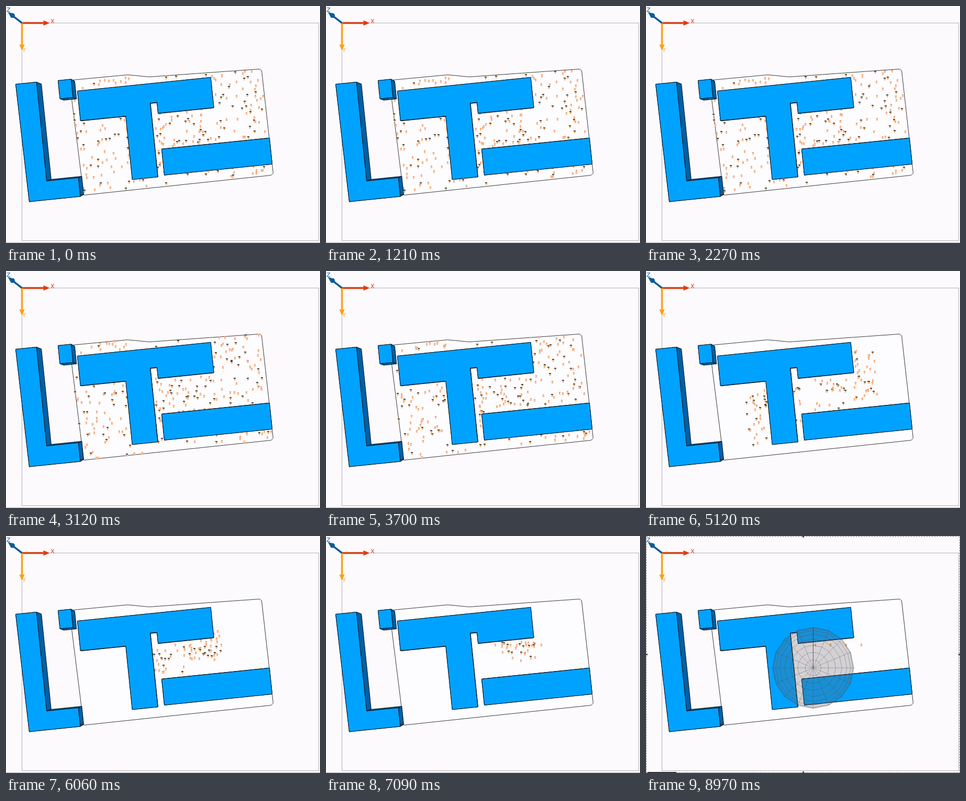
These frames come from a looping animation (600 by 453 pixels, 9000 ms). An HTML page with a canvas:

```html
<!DOCTYPE html>
<html lang="en">
<head>
<meta charset="utf-8">
<title>Crowd simulation</title>
<style>
html, body { margin: 0; width: 100%; height: 100%; overflow: hidden; background: #fcfafd; }
canvas { display: block; }
</style>
</head>
<body>
<canvas id="stage" width="600" height="453"></canvas>
<script>
const ctx = document.getElementById('stage').getContext('2d');
const LOOP = 9000, STEP = 30, TILT = 0.102;
const BLUE = '#00a2ff', SHADE = '#0060a4', INK = '#0c1420';
const EYE = [319, 251.5];

const mix = (a, b, k) => a + (b - a) * k;
const toward = (p, q, kx, ky = kx) => [mix(p[0], q[0], kx), mix(p[1], q[1], ky)];

let seed = 4127;
function rnd() {
  seed = (seed * 1664525 + 1013904223) % 4294967296;
  return seed / 4294967296;
}
const range = (a, b) => mix(a, b, rnd());

// Outline of a tilted block: lengths alternate along its width and its depth
function outline(x, y, ...lengths) {
  const c = Math.cos(TILT), s = Math.sin(TILT), points = [[x, y]];
  lengths.forEach((d, i) => {
    x += d * (i % 2 ? s : c);
    y += d * (i % 2 ? c : -s);
    points.push([x, y]);
  });
  return points;
}

const yard = [[127,141],[232,131],[273,135],[484,120],[488,123],[510,319],[506,323],[148,361],[125,177]];
const tee = outline(136, 162, 256, 58, -107, -21, -13, 142, -49, -122, -87);
const slab = outline(297, 273, 207, 50, -207);
const ell = outline(18, 149, 40, 190, 61, 36, -98);
const cube = outline(99, 142, 25, 35, -25);

function inside(poly, x, y) {
  let hit = false;
  poly.forEach(([ax, ay], i) => {
    const [bx, by] = poly[(i + 1) % poly.length];
    if ((ay > y) !== (by > y) && x < (bx - ax) * (y - ay) / (by - ay) + ax) hit = !hit;
  });
  return hit;
}
const isFree = (x, y) => inside(yard, x, y) && !inside(tee, x, y) && !inside(slab, x, y);

function spot() {
  for (;;) {
    const x = range(128, 506), y = range(124, 358);
    if (isFree(x, y) && isFree(x, y + 3)) return [x, y];
  }
}

function wander([x, y], reach) {
  for (let i = 0; i < 20; i++) {
    const nx = x + range(-reach, reach), ny = y + range(-reach, reach);
    if (isFree(nx, ny)) return [nx, ny];
  }
  return [x, y];
}

// Where a walker queues on the way in, or null if it leaves early
function queueSpot(p) {
  const [x, y] = p;
  if (y < 165 && x < 395 || y > 300 && x > 235) return null;
  if (x < 240) return toward(p, [232, 270], 0.6, 0.2);
  if (x < 296) return p;
  if (x > 395) return toward(p, [397, 212], 0.58, 0.32);
  return y > 250 ? toward(p, [360, y], 0.4) : toward(p, [385, 212], 0.35, 0.55);
}

function makePerson(i) {
  const a = spot(), b = wander(a, 28), c = wander(b, 28);
  const q = rnd() < 0.6 ? queueSpot(c) : null;
  const path = [[790, a], [2270, wander(a, 1)], [3120, b], [4270, c]];
  let end = range(4330, 5080);
  if (q) {
    path.push([5120, q], [7090, [range(335, 400), 203 + 38 * rnd() * rnd()]]);
    end = i % 3 ? range(5150, 7000) : range(7120, 8030);
  }
  return { path, end, dark: rnd() < 0.42 };
}
const people = Array.from({ length: 210 }, (_, i) => makePerson(i));

function place(path, t) {
  const i = path.findIndex(([time]) => t < time);
  if (i === 0) return path[0][1];
  if (i < 0) return path[path.length - 1][1];
  const [t0, a] = path[i - 1], [t1, b] = path[i];
  return toward(a, b, (t - t0) / (t1 - t0));
}

function trace(points, closed = true) {
  ctx.beginPath();
  points.forEach(([x, y]) => ctx.lineTo(x + 0.5, y + 0.5));
  if (closed) ctx.closePath();
}

function stroke(color, width) {
  ctx.strokeStyle = color;
  ctx.lineWidth = width;
  ctx.stroke();
}

function shape(points, fill, line = INK, width = 1) {
  trace(points);
  if (fill) { ctx.fillStyle = fill; ctx.fill(); }
  stroke(line, width);
}

function segment(a, b, color, width) {
  trace([a, b], false);
  stroke(color, width);
}

function rect(x, y, w, h, color) {
  ctx.fillStyle = color;
  ctx.fillRect(x, y, w, h);
}

function person([px, py], dark) {
  const x = Math.round(px), y = Math.round(py);
  if (dark) {
    rect(x - 2, y - 2, 4, 2, '#54463a');
    rect(x - 1, y, 3, 2, '#f8bc78');
    rect(x - 1, y + 2, 2, 1, '#c89058');
  } else {
    rect(x - 1, y - 2, 3, 2, '#f4a06c');
    rect(x - 1, y, 3, 3, '#f4ac80');
    rect(x, y, 1, 2, '#fdeadc');
  }
}

// Top face plus walls that recede toward the eye point
function block(top, depth) {
  const foot = top.map(p => toward(p, EYE, depth));
  top.forEach((p, i) => {
    const j = (i + 1) % top.length;
    shape([p, top[j], foot[j], foot[i]], SHADE);
  });
  shape(top, BLUE);
}

function arrow(tip, color, text, tx, ty) {
  const origin = [30, 32];
  const dx = tip[0] - origin[0], dy = tip[1] - origin[1], n = Math.hypot(dx, dy);
  const ux = dx / n, uy = dy / n, bx = tip[0] - ux * 12, by = tip[1] - uy * 12;
  segment(origin, [bx, by], color, 3.5);
  trace([tip, [bx - uy * 5, by + ux * 5], [bx + uy * 5, by - ux * 5]]);
  ctx.fillStyle = color;
  ctx.fill();
  ctx.font = '11px "DejaVu Sans", sans-serif';
  ctx.fillText(text, tx, ty);
  return [bx, by];
}

function axes() {
  arrow([83, 32], '#dc3a10', 'X', 85, 33);
  arrow([30, 85], '#ff9f10', 'Y', 31, 88);
  const [x, y] = arrow([3, 11], '#0a5c98', 'Z', 1, 11);
  ctx.beginPath();
  ctx.arc(x, y, 4.5, 0, 2 * Math.PI);
  ctx.fill();
}

function backdrop() {
  rect(0, 0, 600, 453, '#fcfafd');
  ctx.lineWidth = 1;
  ctx.strokeStyle = '#b4b2b4';
  ctx.strokeRect(30.5, 32.5, 567, 416);
  rect(0, 452, 600, 1, '#b0aeb0');
  shape(yard, '#fdfcfe', '#383838');
}

function ring(r) {
  return Array.from({ length: 16 }, (_, i) => {
    const a = i * Math.PI / 8;
    return [EYE[0] + r * Math.cos(a), EYE[1] + r * Math.sin(a)];
  });
}

function dome(alpha) {
  const radius = 77.5, rim = ring(radius), line = 'rgba(70,70,75,0.45)';
  ctx.globalAlpha = alpha;
  shape(rim, 'rgba(100,92,96,0.27)', line);
  for (let k = 1; k < 8; k++) shape(ring(radius * Math.sin(k * Math.PI / 16)), null, line, 0.8);
  rim.forEach(p => segment(EYE, p, line, 0.8));
  segment([EYE[0], EYE[1] - radius], EYE, 'rgba(40,40,45,0.6)', 1);

  // selected viewport border with handles
  ctx.setLineDash([3, 2]);
  ctx.strokeStyle = '#707070';
  ctx.strokeRect(0.5, 0.5, 599, 452);
  ctx.setLineDash([]);
  for (const y of [0, 450]) rect(299, y, 3, 3, '#505050');
  for (const x of [0, 597]) rect(x, 225, 3, 3, '#505050');
  rect(3, 451, 55, 2, '#303038');
  ctx.globalAlpha = 1;
}

function draw(t) {
  backdrop();
  people.filter(p => t < p.end).forEach(p => person(place(p.path, t), p.dark));
  if (t >= 3120) for (let i = 0; i < 4; i++) person([323 + i * 29.4, 208], false);
  block(tee, 0.012);
  block(slab, 0.012);
  block(ell, 0.036);
  block(cube, 0.036);
  axes();
  if (t >= 8610) dome(Math.min(1, (t - 8580) / 390));
}

const start = performance.now();
function tick() {
  const t = (performance.now() - start) % LOOP;
  draw(Math.floor(t / STEP) * STEP);
  requestAnimationFrame(tick);
}
tick();
</script>
</body>
</html>
```
